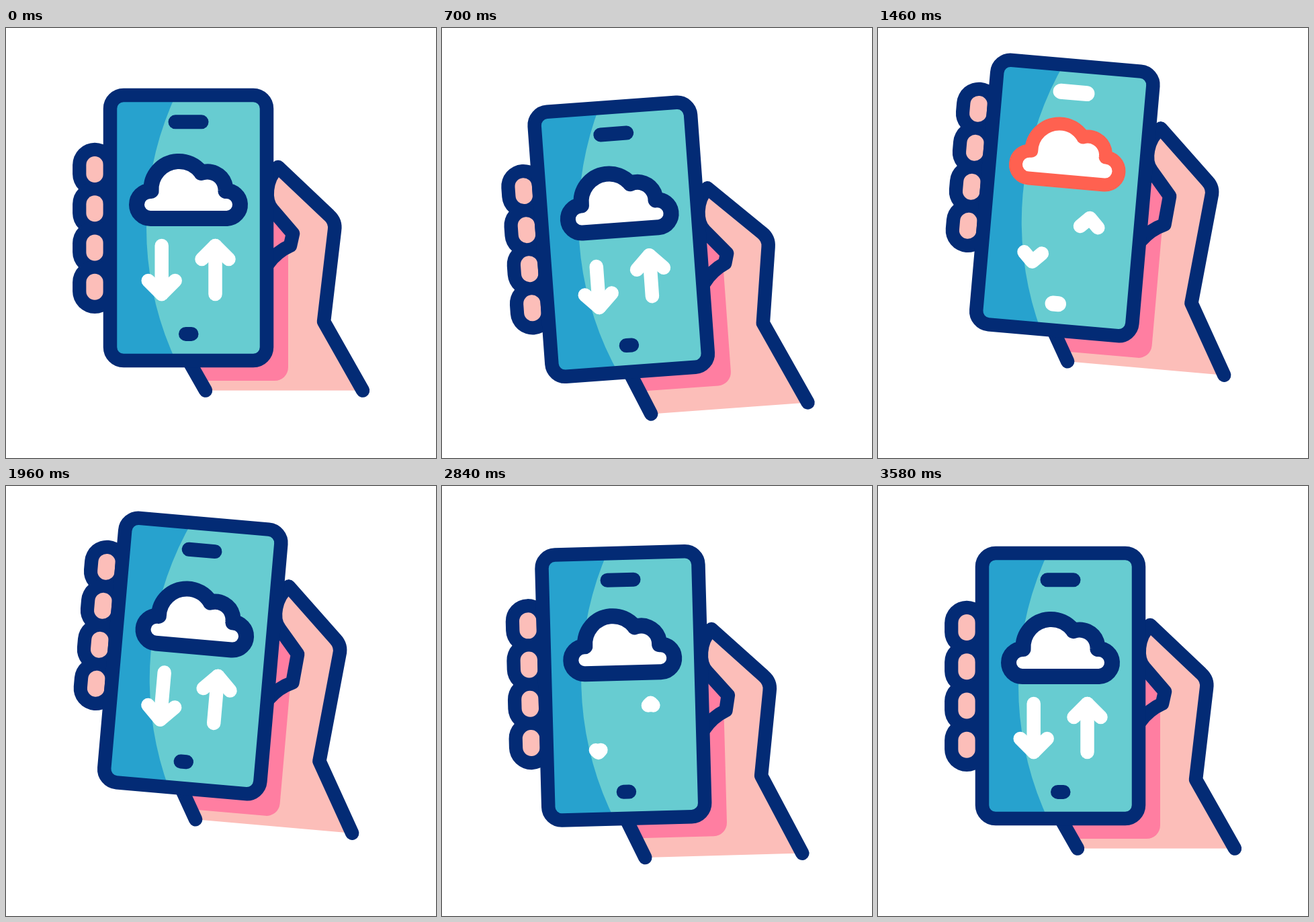
An HTML page with a canvas for the animation above (3.6 s loop, 640x640 px).

```html
<!DOCTYPE html>
<html lang="en">
<head>
<meta charset="utf-8">
<title>Phone sync</title>
<style>
  html, body { margin: 0; width: 100%; height: 100%; overflow: hidden; background: #fff; }
  canvas { display: block; width: 640px; height: 640px; }
</style>
</head>
<body>
<canvas id="stage" width="640" height="640"></canvas>
<script>
const ctx = document.getElementById('stage').getContext('2d');
const LOOP = 3600, BEAT = 1200;
const NAVY = '#032b75', TEAL = '#67ccd1', BLUE = '#27a2ce', SKIN = '#fcbeb9',
      PINK = '#ff7ea1', RED = '#ff6150', WHITE = '#fff';

// Poses: phone centre x, y, angle, then local y shifts of fingers, thumb and wrist.
const REST = [271.5, 297.5, 0, 0, 0, 0];
const LOW = [265.7, 320.5, -5, 8, 28, 22];
const HIGH = [277.8, 253, 5, -34, -25, 0];
const KEYS = [[0, REST], [368, LOW], [544, LOW], [1316, HIGH],
              [2580, HIGH], [3020, LOW], [3460, REST], [LOOP, REST]];
const ALERTS = [[1250, 1700], [2150, 2600]];

const rad = deg => deg * Math.PI / 180;
const clamp = x => Math.min(1, Math.max(0, x));

// cubic-bezier(.42, 0, .58, 1)
function ease(x) {
  x = clamp(x);
  let lo = 0, hi = 1, u = x;
  for (let i = 0; i < 24; i++) {
    u = (lo + hi) / 2;
    const bx = 1.26 * (1 - u) ** 2 * u + 1.74 * (1 - u) * u * u + u ** 3;
    if (bx < x) lo = u; else hi = u;
  }
  return u * u * (3 - 2 * u);
}

function poseAt(t) {
  const i = KEYS.findIndex((key, n) => n > 0 && t <= key[0]);
  const [t0, from] = KEYS[i - 1], [t1, to] = KEYS[i];
  const k = ease((t - t0) / (t1 - t0));
  return from.map((v, n) => v + (to[n] - v) * k);
}

function stroke(color, width) {
  ctx.strokeStyle = color;
  ctx.lineWidth = width;
  ctx.stroke();
}

function fill(color) {
  ctx.fillStyle = color;
  ctx.fill();
}

function line(color, width, ...points) {
  ctx.beginPath();
  points.forEach(([x, y]) => ctx.lineTo(x, y));
  stroke(color, width);
}

function armEdge(thumb, wrist) {
  ctx.moveTo(405, 207 + thumb);
  ctx.lineTo(481, 279 + thumb);
  ctx.quadraticCurveTo(491, 288 + thumb, 489, 301 + thumb);
  ctx.lineTo(473, 437);
  ctx.lineTo(531, 539.5 + wrist);
}

function drawHand(thumb, wrist) {
  ctx.beginPath();
  armEdge(thumb, wrist);
  ctx.lineTo(297, 539.5 + wrist);
  ctx.lineTo(262, 478);
  ctx.lineTo(385, 300);
  ctx.lineTo(389, 240 + thumb);
  fill(SKIN);

  ctx.beginPath();
  ctx.moveTo(275, 490);
  ctx.lineTo(380, 272 + thumb);
  ctx.lineTo(397, 272 + thumb);
  ctx.lineTo(420, 298 + thumb);
  ctx.arcTo(420, 525, 287, 525, 20);
  ctx.lineTo(287, 525);
  fill(PINK);

  ctx.beginPath();
  armEdge(thumb, wrist);
  ctx.moveTo(405, 207 + thumb);
  ctx.bezierCurveTo(386, 225 + thumb, 384, 257 + thumb, 397, 271 + thumb);
  ctx.lineTo(427, 306 + thumb);
  ctx.lineTo(423, 324 + wrist);
  ctx.quadraticCurveTo(403, 333 + wrist, 390, 351 + wrist);
  stroke(NAVY, 20.5);
  line(NAVY, 20.5, [262, 478], [297, 539.5 + wrist]);
}

function drawFingers(shift) {
  for (const [color, width] of [[NAVY, 66], [SKIN, 25.5]]) {
    for (let i = 0; i < 4; i++) {
      const y = 203.8 + 58.2 * i + shift;
      line(color, width, [132.1, y], [132.1, y + 13.5]);
    }
  }
}

function drawPhone() {
  ctx.beginPath();
  ctx.roundRect(155, 100, 233, 395, 20);
  fill(BLUE);
  ctx.save();
  ctx.clip();
  ctx.beginPath();
  ctx.arc(679, 297.5, 470, 0, 2 * Math.PI);
  fill(TEAL);
  ctx.restore();
  ctx.beginPath();
  ctx.roundRect(155, 100, 233, 395, 20);
  stroke(NAVY, 20.5);
}

function drawPills(alert) {
  const color = alert ? WHITE : NAVY, width = alert ? 23 : 21;
  line(color, width, [252, 139.8], [291, 139.8]);
  line(color, width, [267.5, 455.4], [276, 455.4]);
}

function drawCloud(lift, alert) {
  const lobe = (x, y, r, from, to) => ctx.arc(x, y - lift, r, rad(from), rad(to));
  ctx.beginPath();
  lobe(215, 263, 20.5, 90, 273);
  lobe(257.5, 240, 41.5, 176.5, 322.5);
  lobe(300, 241, 27, -110, 3);
  lobe(328, 263, 20.5, -93, 90);
  ctx.closePath();
  fill(WHITE);
  stroke(alert ? RED : NAVY, alert ? 20 : 23);
}

// The shaft retracts into the head first, then the two barbs shrink to the tip.
function drawArrow(x, tip, dir, hidden) {
  const gone = hidden * 100;
  if (gone > 99.5) return;
  const shaft = Math.max(0, 72 - gone);
  const barb = 20 * Math.min(1, (100 - gone) / 28);
  const back = tip - dir * barb;
  line(WHITE, 20.5, [x - barb, back], [x, tip], [x + barb, back]);
  if (shaft) line(WHITE, 20.5, [x, tip], [x, tip - dir * shaft]);
}

function draw(t) {
  const [cx, cy, angle, fingers, thumb, wrist] = poseAt(t);
  const beat = t % BEAT;
  const alert = ALERTS.some(([from, to]) => t >= from && t < to);
  const lift = 10.6 * Math.sin(Math.PI * clamp(beat / 525));
  const hidden = ease(beat / 372) - ease((beat - 372) / 428);

  ctx.setTransform(1, 0, 0, 1, 0, 0);
  ctx.fillStyle = WHITE;
  ctx.fillRect(0, 0, 640, 640);
  ctx.lineCap = ctx.lineJoin = 'round';
  ctx.translate(cx, cy);
  ctx.rotate(rad(angle));
  ctx.translate(-REST[0], -REST[1]);

  drawHand(thumb, wrist);
  drawFingers(fingers);
  drawPhone();
  drawPills(alert);
  drawCloud(lift, alert);
  drawArrow(231.7, 396, 1, hidden);
  drawArrow(311.5, 324, -1, hidden);
}

const start = performance.now();
function tick() {
  draw((performance.now() - start) % LOOP);
  requestAnimationFrame(tick);
}
tick();
</script>
</body>
</html>
```
